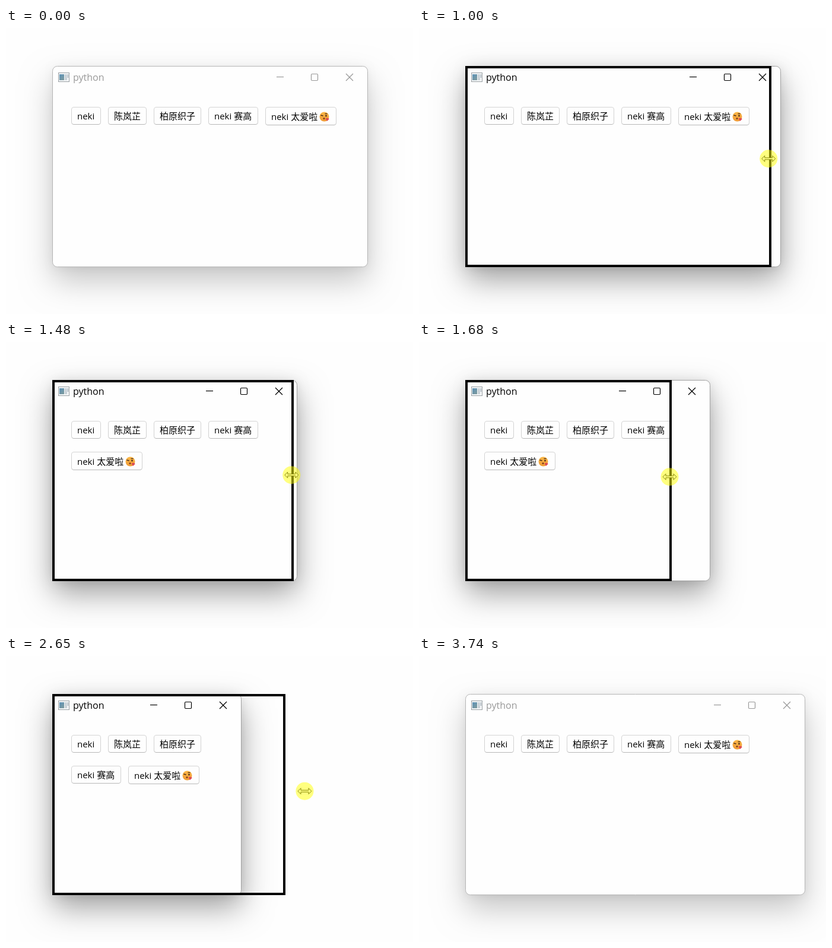
Write an HTML page with a canvas that moves like this. It is 686 px wide and 482 px high and loops after 3.82 s.

```html
<!DOCTYPE html>
<html lang="zh">
<head>
<meta charset="utf-8">
<title>python</title>
<style>
html, body { margin: 0; width: 100%; height: 100%; overflow: hidden; background: #fefefe; }
canvas { display: block; }
</style>
</head>
<body>
<canvas id="stage" width="686" height="482"></canvas>
<script>
const ctx = document.getElementById('stage').getContext('2d');
const LOOP = 3820;
const PAPER = '#fefefe';
const FONT = '"Open Sans", "Noto Sans CJK SC", "Noto Sans CJK", sans-serif';
const LEFT = 78.5, TOP = 64.5, BOTTOM = 402.5;

const buttons = [
  { text: 'neki', w: 50, h: 30 },
  { text: '陈岚芷', w: 65, h: 30 },
  { text: '柏原织子', w: 80, h: 30 },
  { text: 'neki 赛高', w: 84, h: 30 },
  { text: 'neki 太爱啦', w: 120, h: 31, emoji: true }
];

const drags = [
  { from: 840, to: 1320, grip: 2 },
  { from: 1440, to: 1760, grip: 2 },
  { from: 2520, to: 2850, grip: 6.5 }
];

const linear = u => u;
const smooth = u => u * u * (3 - 2 * u);

// start, end, x0, y0, x1, y1, easing
const moves = [
  [100, 640, 647, 474, 611.5, 219.5, smooth],
  [885, 1300, 611.5, 219.5, 493, 223.5, smooth],
  [1440, 1760, 493, 223.5, 399, 228.5, linear],
  [2160, 2200, 399, 228.5, 398.5, 228.5, linear],
  [2200, 2240, 398.5, 228.5, 403.5, 228.5, linear],
  [2520, 2800, 403.5, 228.5, 657.5, 226.5, smooth],
  [3310, 3460, 657.5, 226.5, 621.5, 442, smooth]
];

function pointer(t) {
  const [a, b, x0, y0, x1, y1, ease] = moves.filter(m => t >= m[0]).pop() || moves[0];
  const u = ease(Math.min(1, Math.max(0, (t - a) / (b - a))));
  return { x: x0 + (x1 - x0) * u, y: y0 + (y1 - y0) * u };
}

function snap(t) {
  if (t < 2850) return Math.min(2800, Math.floor(t / 40) * 40);
  return Math.max(2850, Math.floor((t - 20) / 40) * 40 + 20);
}

function rightEdge(t) {
  if (t < 1320) return 609.5;
  if (t < 1760) return 490.5;
  return t < 2850 ? 396.5 : 650.5;
}

function roundRect(x, y, w, h, r) {
  ctx.beginPath();
  ctx.roundRect(x, y, w, h, r);
}

function polygon(points, x, y) {
  ctx.beginPath();
  points.forEach(([px, py]) => ctx.lineTo(x + px, y + py));
  ctx.closePath();
}

function line(x0, y0, x1, y1) {
  ctx.beginPath();
  ctx.moveTo(x0, y0);
  ctx.lineTo(x1, y1);
  ctx.stroke();
}

function disc(x, y, r, color) {
  ctx.fillStyle = color;
  ctx.beginPath();
  ctx.arc(x, y, r, 0, Math.PI * 2);
  ctx.fill();
}

function label(text, x, y, size, color) {
  ctx.font = `${size}px ${FONT}`;
  ctx.fillStyle = color;
  ctx.fillText(text, x, y);
}

function shadow(right, dy, blur, alpha) {
  ctx.save();
  ctx.shadowColor = `rgba(0,0,0,${alpha})`;
  ctx.shadowBlur = blur;
  ctx.shadowOffsetY = dy;
  ctx.fillStyle = PAPER;
  roundRect(LEFT, TOP, right - LEFT, BOTTOM - TOP, 8);
  ctx.fill();
  ctx.restore();
}

function appIcon() {
  ctx.fillStyle = '#f4f6f7';
  ctx.fillRect(88, 75, 19, 16);
  ctx.strokeStyle = '#9aa0a4';
  ctx.lineWidth = 1;
  ctx.strokeRect(88.5, 75.5, 18, 15);
  const g = ctx.createLinearGradient(90, 78, 98, 88);
  g.addColorStop(0, '#5d93b8');
  g.addColorStop(1, '#7f9a9c');
  ctx.fillStyle = g;
  ctx.fillRect(90, 78, 8, 10);
  ctx.fillStyle = '#c9d2d8';
  ctx.fillRect(99, 78, 4, 10);
  ctx.fillStyle = '#8c9aa4';
  ctx.fillRect(104, 78, 1, 6);
}

function controls(right, color) {
  const min = right - 147.5, max = right - 89.5, close = right - 30.5;
  ctx.strokeStyle = color;
  ctx.lineWidth = 1.2;
  line(min - 6, 82.5, min + 6, 82.5);
  roundRect(max - 5.5, 77.5, 11, 11, 1.5);
  ctx.stroke();
  line(close - 6, 77, close + 6, 89);
  line(close - 6, 89, close + 6, 77);
}

function kissFace(x, y) {
  const g = ctx.createLinearGradient(x, y - 8, x, y + 8);
  g.addColorStop(0, '#fbb848');
  g.addColorStop(1, '#ee9a35');
  disc(x, y, 8, g);
  ctx.strokeStyle = '#4a2f1c';
  ctx.lineWidth = 1.3;
  line(x - 6, y - 2.5, x - 2, y - 1.5);
  disc(x + 3, y - 1.5, 1.4, '#4a2f1c');
  line(x + 1, y - 5, x + 5, y - 5);
  disc(x - 0.5, y + 3, 1.5, '#7a3b20');
  disc(x + 4, y + 3.5, 1.6, '#dd4a55');
  disc(x + 6.2, y + 3.8, 1.5, '#dd4a55');
  ctx.beginPath();
  ctx.moveTo(x + 2.7, y + 4.4);
  ctx.lineTo(x + 7.4, y + 4.8);
  ctx.lineTo(x + 4.6, y + 7.4);
  ctx.fill();
}

function button({ text, w, h, emoji }, x, y) {
  const g = ctx.createLinearGradient(0, y, 0, y + h);
  g.addColorStop(0, '#d4d4d4');
  g.addColorStop(0.88, '#d0d0d0');
  g.addColorStop(1, '#b4b4b4');
  ctx.strokeStyle = g;
  ctx.lineWidth = 1;
  roundRect(x + 0.5, y + 0.5, w - 1, h - 1, 3.5);
  ctx.stroke();
  label(text, x + 10, y + h - 9, 15, '#000');
  if (emoji) kissFace(x + 99.5, y + 16.5);
}

function flow(right) {
  let x = 110, y = 133;
  for (const b of buttons) {
    if (x + b.w > right - 31) {
      x = 110;
      y += 52;
    }
    button(b, x, y);
    x += b.w + 12;
  }
}

function appWindow(right, active) {
  if (active) {
    shadow(right, 22, 52, 0.36);
    shadow(right, 2, 18, 0.1);
  } else {
    shadow(right, 24, 52, 0.22);
    shadow(right, 2, 12, 0.06);
  }
  ctx.strokeStyle = active ? '#a2a2a2' : '#b6b6b6';
  ctx.lineWidth = 1;
  roundRect(LEFT, TOP, right - LEFT, BOTTOM - TOP, 8);
  ctx.stroke();
  appIcon();
  const ink = active ? '#000' : '#999';
  label('python', 113, 89, 16, ink);
  controls(right, ink);
  flow(right);
}

const half = [[-11.5, 0], [-6.5, -5], [-6.5, -1.5]];
const resizeShape = [
  ...half,
  ...half.map(([x, y]) => [-x, y]).reverse(),
  ...half.map(([x, y]) => [-x, -y]).slice(1),
  ...half.map(([x, y]) => [x, -y]).reverse().slice(0, 2)
];
const arrowShape = [[0, 0], [0, 16], [4, 12.5], [6.5, 18.5], [9, 17.5], [6.5, 12], [11.5, 12]];

function cursor(p, shape) {
  polygon(shape, p.x, p.y);
  ctx.fillStyle = '#fff';
  ctx.fill();
  ctx.strokeStyle = '#111';
  ctx.lineWidth = 1;
  ctx.stroke();
}

function draw(now) {
  const t = snap(now % LOOP);
  const right = rightEdge(t);
  const p = pointer(t);
  const drag = drags.find(d => t >= d.from && t < d.to);

  ctx.fillStyle = PAPER;
  ctx.fillRect(0, 0, 686, 482);
  appWindow(right, t >= 840 && t < 3740);

  if (drag) {
    const edge = Math.round(pointer(t - 20).x - drag.grip);
    if (Math.abs(edge - right) > 2) {
      ctx.strokeStyle = '#000';
      ctx.lineWidth = 4;
      ctx.strokeRect(80, 66, edge - 82, 335);
    }
  }

  if (t >= 120 && t < 3500) {
    const nearEdge = Math.abs(p.x - right) < 8 && p.y < BOTTOM;
    const adjusting = t >= 2240 && t < 2320;
    cursor(p, drag || (nearEdge && !adjusting) ? resizeShape : arrowShape);
  }
  if (drag) disc(p.x, p.y, 15, 'rgba(255,255,0,0.5)');
}

const start = performance.now();
function tick() {
  draw(performance.now() - start);
  requestAnimationFrame(tick);
}
tick();
</script>
</body>
</html>
```
